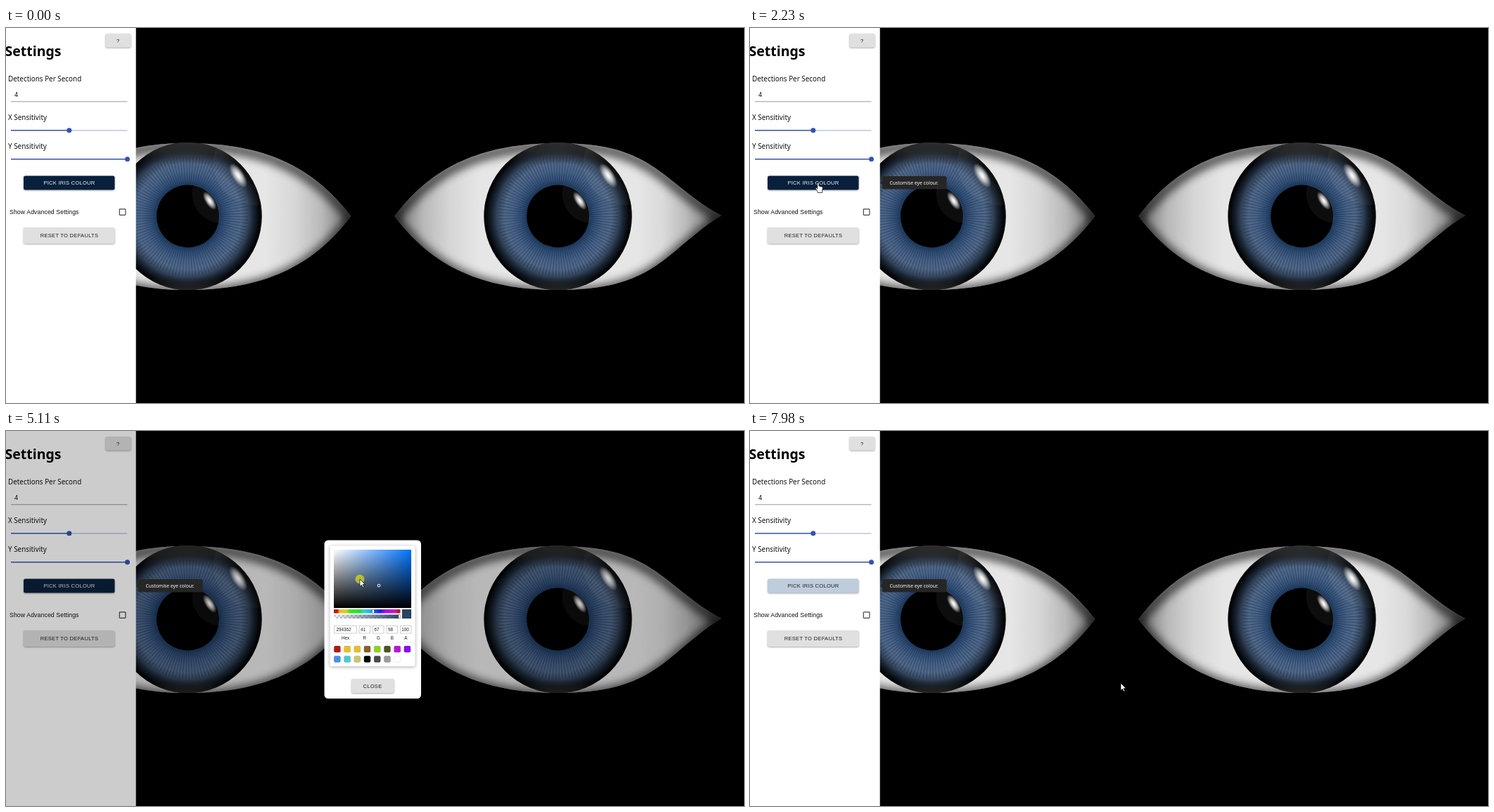
Animation, 1049 px wide and 534 px high, one loop 8000 ms. Source, as an HTML page:

```html
<!DOCTYPE html>
<html lang="en">
<head>
<meta charset="utf-8">
<title>Eye settings</title>
<style>
  html, body { margin: 0; height: 100%; overflow: hidden; background: #000; }
  svg { display: block; width: 100vw; height: 100vh; }
  text { font-family: "Noto Sans", "Open Sans", sans-serif; font-size: 9.9px; fill: #111; }
  .title { font-size: 19.5px; font-weight: 700; fill: #000; }
  .arial { font: 8.75px "Liberation Sans", Arial, sans-serif; letter-spacing: .08px; }
  .cap { font: 7.6px "Liberation Sans", Arial, sans-serif; letter-spacing: .24px; text-anchor: middle; fill: #222; }
  .tip { font-size: 6.8px; fill: #fff; }
  #fields text { font: 6.3px "Liberation Sans", Arial, sans-serif; fill: #222; }
  #fields .label { text-anchor: middle; }
  #fields rect { fill: #fff; stroke: #bbb; stroke-width: .7; }
  .btn { fill: #e0e0e0; filter: drop-shadow(0 1px 1px #0005); }
</style>
</head>
<body>
<svg viewBox="0 0 1049 534">
  <defs>
    <path id="lid" d="M-232 0C-184-63-119-104 0-104C86-104 121-85 166-48C191-28 211-12 233-1C207 14 183 37 158 57C123 85 86 105 0 105C-119 105-184 63-232 0Z"/>
    <clipPath id="lidClip"><use href="#lid"/></clipPath>
    <clipPath id="irisClip"><circle r="105.2"/></clipPath>
    <clipPath id="pupilClip"><circle r="45.5"/></clipPath>
    <filter id="soft" x="-20%" y="-20%" width="140%" height="140%"><feGaussianBlur stdDeviation="6.5"/></filter>
    <linearGradient id="white">
      <stop offset="0" stop-color="#555"/><stop offset=".035" stop-color="#8c8c8c"/>
      <stop offset=".09" stop-color="#b9b9b9"/><stop offset=".17" stop-color="#d6d6d6"/>
      <stop offset=".26" stop-color="#e6e6e6"/><stop offset=".74" stop-color="#e6e6e6"/>
      <stop offset=".82" stop-color="#dadada"/><stop offset=".89" stop-color="#bbb"/>
      <stop offset=".95" stop-color="#8c8c8c"/><stop offset="1" stop-color="#505050"/>
    </linearGradient>
    <radialGradient id="iris">
      <stop offset=".42" stop-color="#1e3a5e"/><stop offset=".5" stop-color="#314e75"/>
      <stop offset=".62" stop-color="#486287"/><stop offset=".72" stop-color="#506888"/>
      <stop offset=".8" stop-color="#3b4e68"/><stop offset=".89" stop-color="#182330"/>
      <stop offset=".97" stop-color="#030507"/><stop offset="1" stop-color="#000"/>
    </radialGradient>
    <linearGradient id="lidShade" x2="0" y2="1">
      <stop offset="0" stop-color="#333" stop-opacity=".9"/><stop offset=".06" stop-color="#2b2b2b" stop-opacity=".75"/>
      <stop offset=".15" stop-color="#222" stop-opacity="0"/><stop offset=".91" stop-color="#222" stop-opacity="0"/>
      <stop offset="1" stop-color="#303030" stop-opacity=".8"/>
    </linearGradient>
    <radialGradient id="shine">
      <stop offset=".15" stop-color="#f4f4f4"/><stop offset=".5" stop-color="#eee" stop-opacity=".7"/>
      <stop offset="1" stop-color="#eee" stop-opacity="0"/>
    </radialGradient>
    <g id="sclera">
      <use href="#lid" fill="url(#white)"/>
      <g clip-path="url(#lidClip)"><use href="#lid" y="4" fill="none" stroke="#000" stroke-width="14" opacity=".68" filter="url(#soft)"/></g>
    </g>
    <g id="ball">
      <circle r="105.2" fill="url(#iris)"/>
      <circle r="65" fill="none" stroke="#0a1930" stroke-opacity=".35" stroke-width="41" pathLength="440" stroke-dasharray="1 3"/>
      <circle r="44.5"/>
      <g clip-path="url(#irisClip)">
        <rect x="-106" y="-105" width="212" height="210" fill="url(#lidShade)"/>
        <circle cx="96" cy="-76" r="60" fill="#fff" opacity=".04"/>
      </g>
      <circle cx="48" cy="-32" r="42" fill="#fff" opacity=".05" clip-path="url(#pupilClip)"/>
      <ellipse rx="8.5" ry="20" transform="translate(71.5 -58) rotate(-33)" fill="url(#shine)"/>
      <ellipse rx="6.5" ry="15" transform="translate(31 -22) rotate(-33)" fill="url(#shine)"/>
    </g>

    <linearGradient id="toHue"><stop stop-color="#fff"/><stop offset="1" stop-color="#0074ff"/></linearGradient>
    <linearGradient id="toBlack" x2="0" y2="1"><stop stop-opacity="0"/><stop offset="1"/></linearGradient>
    <linearGradient id="hues">
      <stop offset=".05" stop-color="#bf1710"/><stop offset=".09" stop-color="#e5bf2b"/>
      <stop offset=".19" stop-color="#e0c828"/><stop offset=".24" stop-color="#3be61e"/>
      <stop offset=".4" stop-color="#1fe03c"/><stop offset=".45" stop-color="#30d0d4"/>
      <stop offset=".55" stop-color="#25b0e8"/><stop offset=".6" stop-color="#1460f0"/>
      <stop offset=".7" stop-color="#2a18f0"/><stop offset=".78" stop-color="#a010ee"/>
      <stop offset=".92" stop-color="#d410c8"/><stop offset=".97" stop-color="#bf1710"/>
    </linearGradient>
    <linearGradient id="alpha"><stop id="alphaFrom" stop-opacity="0"/><stop id="alphaTo" offset="1"/></linearGradient>
    <pattern id="checks" width="6" height="6" patternUnits="userSpaceOnUse" x="466" y="261.5">
      <path d="M0 0h6v6h-6z" fill="#fff"/><path d="M0 0h3v3h-3zM3 3h3v3h-3z" fill="#ccc"/>
    </pattern>
  </defs>

  <rect width="1049" height="534"/>
  <use href="#sclera" transform="translate(258.5 268) scale(-1 1)"/>
  <use href="#ball" x="258.5" y="268"/>
  <use href="#sclera" x="784" y="268"/>
  <use href="#ball" x="784.5" y="268"/>

  <g id="drawer">
    <rect x="-20" width="204.7" height="534" fill="#fff"/>
    <text class="title" x="-1.5" y="39.5">Settings</text>
    <rect class="btn" x="141.5" y="8" width="36" height="19.5" rx="2.5"/>
    <text class="cap" x="159.3" y="20.5">?</text>
    <text x="3" y="75.7">Detections Per Second</text>
    <text x="12" y="98" style="font-size:9px">4</text>
    <path d="M7 104.8h165.5" stroke="#999"/>
    <text x="3" y="131.3">X Sensitivity</text>
    <text x="3" y="172.3">Y Sensitivity</text>
    <g stroke="#3353b2" stroke-width="1.5">
      <path d="M90 145.8h82.5" stroke="#b3bbe0" stroke-width="1.3"/>
      <path d="M7 145.8h83M7 186.8h165.5"/>
    </g>
    <g fill="#3353b2"><circle cx="89.8" cy="145.8" r="3.5"/><circle cx="172.5" cy="186.8" r="3.5"/></g>
    <rect class="btn" id="pick" x="25" y="210.5" width="129.5" height="20" rx="2.5"/>
    <text class="cap" id="pickText" x="90" y="223">PICK IRIS COLOUR</text>
    <text class="arial" x="5" y="265">Show Advanced Settings</text>
    <rect x="161.3" y="257.8" width="8.6" height="8.6" rx=".8" fill="none" stroke="#444" stroke-width="1.2"/>
    <rect class="btn" x="25" y="284" width="129.5" height="23" rx="2.5"/>
    <text class="cap" x="90" y="298.2">RESET TO DEFAULTS</text>
  </g>

  <g id="modal">
    <rect width="1049" height="534" opacity=".2"/>
    <rect x="452.5" y="155.5" width="137.5" height="225.5" rx="5.5" fill="#fff"/>
    <rect x="460.5" y="163.5" width="121" height="171.5" rx="2.5" fill="#fff" style="filter:drop-shadow(0 1.5px 2.5px #0005)"/>
    <rect x="466" y="169" width="110" height="83" fill="url(#toHue)"/>
    <rect x="466" y="169" width="110" height="83" fill="url(#toBlack)"/>
    <circle id="marker" r="1.9" fill="none" stroke="#fff"/>
    <rect x="466" y="254" width="94.5" height="5.5" fill="url(#hues)"/>
    <rect x="466" y="261.5" width="94.5" height="5.5" fill="url(#checks)"/>
    <rect x="466" y="261.5" width="94.5" height="5.5" fill="url(#alpha)"/>
    <g fill="#fff" stroke="#0006" stroke-width=".4">
      <rect x="520.6" y="254.4" width="2.6" height="4.7"/><rect x="558" y="261.9" width="2.6" height="4.7"/>
    </g>
    <rect id="sample" x="563" y="254" width="13" height="13" stroke="#0003" stroke-width=".5"/>
    <g id="fields"></g>
    <path d="M460.5 300.8h121" stroke="#eee"/>
    <g id="presets"></g>
    <rect class="btn" x="491" y="353" width="60.5" height="20" rx="2.5"/>
    <text class="cap" x="521" y="366">CLOSE</text>
  </g>

  <g id="tooltip">
    <path d="M185 220.5l4-3.5v7z" fill="#262626"/>
    <rect x="188" y="211" width="91.5" height="18.5" rx="2.5" fill="#262626"/>
    <text class="tip" x="198.5" y="223">Customise eye colour.</text>
  </g>

  <g id="cursor">
    <circle id="press" r="6.5" fill="#c8ca2a" opacity=".85"/>
    <g fill="#fff" stroke="#000" stroke-width=".7" stroke-linejoin="round">
      <path id="arrow" d="M0 0V10.5L2.5 8.2L4.2 12L5.9 11.2L4.2 7.6H7.4Z"/>
      <path id="hand" d="M-1.2.8C-1.2-.6 1-.6 1 .8V5L5 6C6.2 6.3 6.500 7 6.300 8L5.600 12V14.500H-.8V13L-3.600 9C-4.200 8-3 7-2.200 7.800L-1.200 8.800Z"/>
    </g>
  </g>
</svg>
<script>
const LOOP = 8000, STEP = 77.7, START = 290;
const $ = id => document.getElementById(id);
const clamp = v => Math.min(1, Math.max(0, v));
const ramp = (t, from, ms) => clamp((t - from) / ms);
const lerp = (a, b, k) => a + (b - a) * k;
const show = (id, on) => $(id).setAttribute("display", on ? "inline" : "none");
const rgb = c => `rgb(${c.map(Math.round)})`;
const mix = (a, b, k) => a.map((v, i) => lerp(v, b[i], k));

// Time, x and y of the pointer
const route = [
  [756, 967, 533], [834, 879, 502], [1078, 569, 384], [1300, 330, 297], [1500, 185, 245],
  [1700, 112, 226], [1920, 97, 220], [2630, 97, 220], [2900, 270, 238], [3100, 430, 258],
  [3250, 525, 260], [3400, 560, 238], [4020, 563, 234.5], [4570, 563, 234.5], [4800, 556, 231],
  [4900, 556, 231], [5029.7, 529.98, 220.1], [5107, 503, 211], [5185, 492, 203], [5350, 486, 194],
  [5700, 482, 182], [6040, 481, 180.39], [6200, 481, 180.39], [6430, 498, 245], [6661, 513, 307],
  [6970, 531, 361], [7050, 530, 361], [7280, 527, 359]
];
function pointer(t) {
  const i = route.findIndex(k => k[0] > t);
  if (i < 0) return route.at(-1).slice(1);
  if (i === 0) return route[0].slice(1);
  const a = route[i - 1], b = route[i], k = ramp(t, a[0], b[0] - a[0]);
  return [lerp(a[1], b[1], k), lerp(a[2], b[2], k)];
}

// Saturation and value come from the place in the picker; the hue is fixed
function colourAt([x, y]) {
  const s = clamp((x - 466) / 110), v = 255 * clamp((252 - y) / 83);
  const low = v * (1 - s);
  return [low, lerp(low, v, .455), v];
}
const markerAt = t => t < 4560 ? [559.5, 232.47] : pointer(Math.min(6100, Math.max(4570, t - STEP)));

const FIRST = colourAt(markerAt(0)), MIDDLE = colourAt(markerAt(5350)), LAST = colourAt(markerAt(7000));

// Cubic easing with end points (0,0), (1,1) and controls (x1,0), (x2,1)
function ease(x, x1, x2) {
  let lo = 0, hi = 1;
  for (let i = 0; i < 20; i++) {
    const s = (lo + hi) / 2, r = 1 - s;
    if (3 * r * r * s * x1 + 3 * r * s * s * x2 + s ** 3 < x) lo = s; else hi = s;
  }
  return lo * lo * (3 - 2 * lo);
}

$("fields").innerHTML = [["Hex", 466.5, 32, 3], ["R", 502, 15.5, 2], ["G", 521.5, 15.5, 2], ["B", 541, 15.5, 2], ["A", 560.5, 15.5, 1.8]]
  .map(([name, x, w, pad]) => `<rect x="${x}" y="277.5" width="${w}" height="10.5"/>
    <text class="value" x="${x + pad}" y="285">100</text>
    <text class="label" x="${x + w / 2}" y="296.6">${name}</text>`).join("");
const values = document.querySelectorAll(".value");

$("presets").innerHTML = "b5170f e5bf2b e5bf2b 8b5f2a 8cd321 4a5523 bd10e0 8b0cf0 4590e8 50c8d0 cdc375 000 4a4a4a 9b9b9b fff"
  .split(" ").map((c, i) => `<rect x="${466.2 + i % 8 * 14.22}" y="${i < 8 ? 306 : 320.3}" width="9.3" height="9.3" rx="2"
    fill="#${c}" stroke="#0002" stroke-width=".5"/>`).join("");

function draw(now) {
  const time = now % LOOP;
  const t = START + Math.floor((time - START + 5) / STEP) * STEP;
  const [x, y] = pointer(t);

  const shut = ease(ramp(t, 270, 195), .4, .6) - ease(ramp(t, 699, 225), 0, .2);
  $("drawer").setAttribute("transform", `translate(${-185 * shut})`);

  $("tooltip").setAttribute("opacity", ramp(t, 1700, 200));
  const fade = ramp(t, 2233, 150) - ramp(t, 7790, 190);
  $("modal").setAttribute("opacity", fade);

  const spot = markerAt(t), colour = colourAt(spot).map(Math.round);
  $("marker").setAttribute("transform", `translate(${spot})`);
  $("sample").setAttribute("fill", rgb(colour));
  $("alphaFrom").setAttribute("stop-color", rgb(colour));
  $("alphaTo").setAttribute("stop-color", rgb(colour));
  const hex = colour.map(c => c.toString(16).padStart(2, "0")).join("").toUpperCase();
  [hex, ...colour].forEach((v, i) => values[i].textContent = v);

  const mid = ramp(t, 5400, 250);
  $("pick").style.fill = rgb(mix(mix(FIRST, MIDDLE, mid), LAST, ramp(t, 6200, 250)));
  $("pickText").style.fill = rgb(mix([235, 240, 245], [30, 36, 44], mid));

  const over = (l, top, r, b) => x > l && x < r && y > top && y < b;
  const hand = t < 2600 ? over(25, 210, 155, 231) : fade > 0 && (over(466, 305, 576, 330) || over(491, 353, 552, 373));
  show("cursor", t > 750);
  show("hand", hand);
  show("arrow", !hand);
  show("press", t > 4560 && t < 6060);
  $("cursor").setAttribute("transform", `translate(${x} ${y})`);
  requestAnimationFrame(draw);
}
requestAnimationFrame(draw);
</script>
</body>
</html>
```
